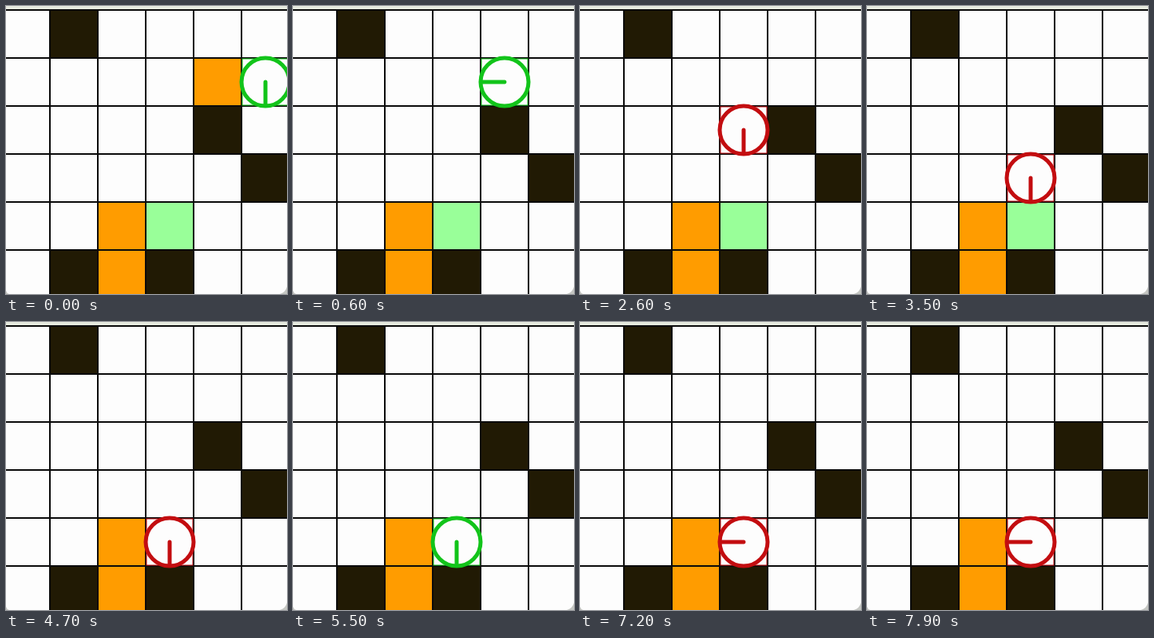
These frames come from a looping animation (352 px wide and 360 px high, 8 s). An HTML page:

```html
<!DOCTYPE html>
<html lang="en">
<head>
<meta charset="utf-8">
<title>Grid robot</title>
<style>
html, body { margin: 0; width: 100%; height: 100%; overflow: hidden; background: #fdfdfd; }
svg { display: block; width: 352px; height: 360px; }
.wall { fill: #211a04; }
.item { fill: #ff9c00; }
.base { fill: #99ff99; }
.lines { stroke: #0a0a0a; stroke-width: 2; fill: none; }
.ring { fill: #fdfdfd; stroke-width: 5; }
.hand { fill: none; stroke-width: 5; stroke-linecap: round; }
#robot, #turn, #taken { animation: 8s step-end infinite; }
#robot { animation-name: move, load; }
#turn { animation-name: turn; }
#taken { animation-name: take; }

@keyframes move {
  0%      { transform: translate(325px, 95px); }
  6.25%   { transform: translate(265px, 95px); }
  23.75%  { transform: translate(205px, 95px); }
  32.5%   { transform: translate(205px, 155px); }
  41.25%  { transform: translate(205px, 215px); }
  50%     { transform: translate(205px, 275px); }
  77.5%   { transform: translate(265px, 275px); }
  86.25%, 100% { transform: translate(205px, 275px); }
}
@keyframes turn {
  0%     { transform: rotate(0deg); }
  6.25%  { transform: rotate(90deg); }
  32.5%  { transform: rotate(0deg); }
  77.5%  { transform: rotate(-90deg); }
  86.25%, 100% { transform: rotate(90deg); }
}
@keyframes load {
  0%     { stroke: #12c41a; }
  15%    { stroke: #c30d10; }
  60%    { stroke: #12c41a; }
  77.5%, 100% { stroke: #c30d10; }
}
@keyframes take {
  0% { opacity: 1; }
  6.25%, 100% { opacity: 0; }
}
</style>
</head>
<body>
<svg viewBox="0 0 352 360">
  <rect width="352" height="360" fill="#fdfdfd"/>
  <rect width="352" height="4" fill="#e6eadf"/>
  <g class="wall">
    <rect x="55" y="5" width="60" height="60"/>
    <rect x="235" y="125" width="60" height="60"/>
    <rect x="295" y="185" width="60" height="60"/>
    <rect x="55" y="305" width="60" height="60"/>
    <rect x="175" y="305" width="60" height="60"/>
  </g>
  <rect class="item" x="115" y="245" width="60" height="120"/>
  <rect class="item" id="taken" x="235" y="65" width="60" height="60"/>
  <rect class="base" x="175" y="245" width="60" height="60"/>
  <path class="lines" d="M55 4V360M115 4V360M175 4V360M235 4V360M295 4V360
    M0 5H352M0 65H352M0 125H352M0 185H352M0 245H352M0 305H352"/>
  <path d="M352 351V360H343Q350 358 352 351ZM0 356V360H4Q1 359 0 356Z" fill="#c4c6c2"/>
  <g id="robot">
    <rect x="-29" y="-29" width="58" height="58" fill="#fdfdfd"/>
    <circle class="ring" r="30"/>
    <g id="turn"><path class="hand" d="M0 0V29"/></g>
  </g>
</svg>
</body>
</html>
```
